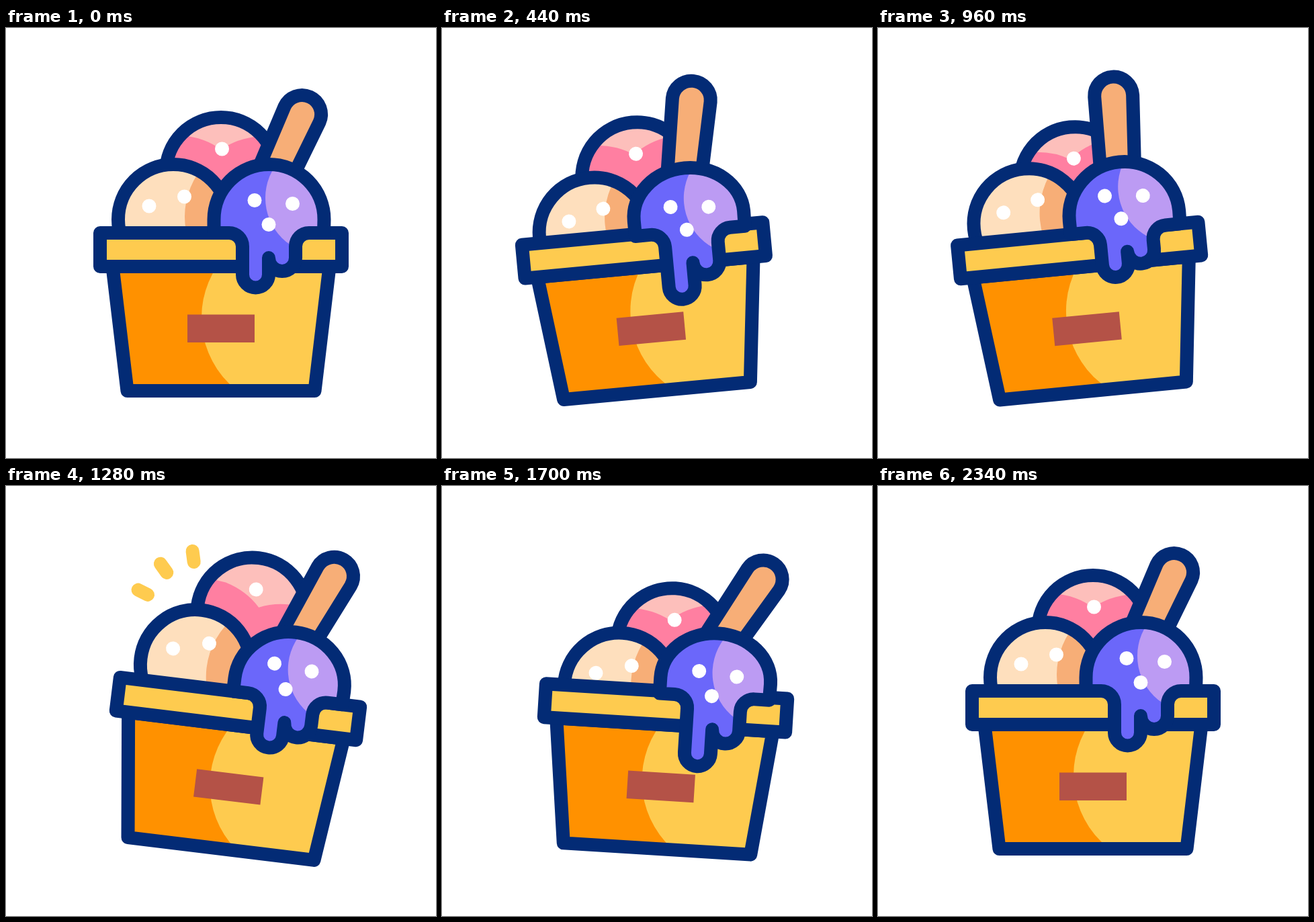
Write an HTML page with a canvas that moves like this. It is 640 px wide and 640 px high and loops after 2400 ms.

```html
<!DOCTYPE html>
<html lang="en">
<head>
<meta charset="utf-8">
<title>Ice cream tub</title>
<style>
  html, body { margin: 0; width: 100%; height: 100%; overflow: hidden; background: #fff; }
  canvas { display: block; width: 100vw; height: 100vh; }
</style>
</head>
<body>
<canvas id="stage" width="640" height="640"></canvas>
<script>
const ctx = document.getElementById('stage').getContext('2d');
const LOOP = 2400;
const TAU = Math.PI * 2;
const RAD = Math.PI / 180;
const NAVY = '#032b75', YELLOW = '#fecb4f', ORANGE = '#ff9100', CARAMEL = '#f7ae77';

// All scoops bounce to the same beats (ms), each with its own delay and heights.
const BEATS = [90, 650, 1070, 1640, 2000, 2150];

// Eased step from 0 to 1 between two times.
function ramp(t, from, to) {
  const u = Math.min(1, Math.max(0, (t - from) / (to - from)));
  return u * u * (3 - 2 * u);
}

function bounce(t, delay, ...peaks) {
  const stops = [0, ...peaks, 0];
  let y = 0;
  for (let i = 1; i < stops.length; i++) {
    y += (stops[i] - stops[i - 1]) * ramp(t - delay, BEATS[i - 1], BEATS[i]);
  }
  return y;
}

function disc(x, y, r, color) {
  ctx.fillStyle = color;
  ctx.beginPath();
  ctx.arc(x, y, r, 0, TAU);
  ctx.fill();
}

const dot = (x, y) => disc(x, y, 10.5, '#fff');

function polygon(...coords) {
  const path = new Path2D();
  for (let i = 0; i < coords.length; i += 2) path.lineTo(coords[i], coords[i + 1]);
  path.closePath();
  return path;
}

function circle(x, y, r) {
  const path = new Path2D();
  path.arc(x, y, r, 0, TAU);
  return path;
}

// Fill a shape, paint details clipped to it, then outline it.
function outlined(path, color, details) {
  ctx.fillStyle = color;
  ctx.fill(path);
  if (details) {
    ctx.save();
    ctx.clip(path);
    details();
    ctx.restore();
  }
  ctx.strokeStyle = NAVY;
  ctx.lineWidth = 20;
  ctx.stroke(path);
}

function drawRays(t) {
  const head = 62.5 + 50 * ramp(t, 1080, 1340);
  const tail = 62.5 + 50 * ramp(t, 1122, 1422);
  if (head <= tail) return;
  ctx.strokeStyle = YELLOW;
  ctx.lineWidth = 20;
  for (let i = 0; i < 3; i++) {
    const angle = (199.6 + 28 * i) * RAD;
    const c = Math.cos(angle), s = Math.sin(angle);
    ctx.beginPath();
    ctx.moveTo(250.5 + c * tail, 208 + s * tail);
    ctx.lineTo(250.5 + c * head, 208 + s * head);
    ctx.stroke();
  }
}

function drawPink(t) {
  const y = bounce(t, 180, 26, -30, 24.5, -11);
  ctx.save();
  ctx.translate(3.5 * (ramp(t, 400, 800) - ramp(t, 1700, 2250)), y);
  outlined(circle(320, 215, 82), '#ff7fa1', () => {
    // The shine lags behind and tips against the bounce.
    ctx.translate(320 - 0.3 * y, 180 - 0.85 * Math.min(y, 0));
    ctx.rotate(-0.35 * y * RAD);
    ctx.fillStyle = '#fdbfbb';
    ctx.beginPath();
    ctx.moveTo(-100, -17);
    ctx.lineTo(-58, -20);
    ctx.quadraticCurveTo(-24, -17, 0, 1);
    ctx.quadraticCurveTo(24, -16, 58, -19);
    ctx.lineTo(110, -17);
    ctx.lineTo(110, -120);
    ctx.lineTo(-100, -120);
    ctx.fill();
  });
  dot(321.5, 180);
  ctx.restore();
}

function drawStick(t) {
  const lift = 11 * (ramp(t, 0, 900) - ramp(t, 1150, 2200));
  const angle = 24.5 - 26.3 * ramp(t, 60, 800) + 34.3 * ramp(t, 800, 1530) - 8 * ramp(t, 1530, 2100);
  ctx.save();
  ctx.translate(387.5, 245 - lift);
  ctx.rotate(angle * RAD);
  const path = new Path2D();
  path.moveTo(-25, 0);
  path.lineTo(-28.5, -128);
  path.arc(0, -128, 28.5, Math.PI, TAU);
  path.lineTo(25, 0);
  outlined(path, CARAMEL);
  ctx.restore();
}

function drawTan(t) {
  const y = bounce(t, 70, 23.5, -18, 19.5, -8);
  ctx.save();
  ctx.translate(0, y);
  outlined(circle(249, 285, 82), '#fedfbd', () => disc(381, 281 - 0.5 * y, 115, CARAMEL));
  dot(213, 265);
  dot(265.5, 251);
  ctx.restore();
}

function drawTub() {
  outlined(polygon(158.5, 355, 180.5, 540, 459.5, 540, 481.5, 355), ORANGE,
    () => disc(429, 431, 138, YELLOW));
  ctx.fillStyle = '#b45247';
  ctx.fillRect(270, 426.5, 100, 41.5);
  outlined(polygon(140, 305, 500, 305, 500, 355, 140, 355), YELLOW);
}

function drawPurple(t) {
  const drip = bounce(t, 0, 31.2, -20, 30, -6);
  const sag = ramp(t, 0, 400) - ramp(t, 1550, 2150);
  const top = 4.8 * sag + 0.27 * drip;
  const base = 305 + 0.14 * Math.max(drip, 0);
  const shift = 2.3 * sag + 0.5 * drip;
  const long = 367 + drip, short = 342 + shift;
  const path = new Path2D();
  path.moveTo(309.5, base);
  path.lineTo(309.5, 285);
  path.ellipse(391.5, 285, 82, 82 - top, 0, Math.PI, TAU);
  path.lineTo(473, base);
  path.lineTo(451, base);
  path.arcTo(431, base, 431, base + 20, 20);
  path.lineTo(431, short);
  path.arc(411, short, 20, 0, Math.PI);
  path.lineTo(391, long);
  path.arc(371.5, long, 19.5, 0, Math.PI);
  path.lineTo(352, base + 20);
  path.arcTo(352, base, 332, base, 20);
  path.closePath();
  outlined(path, '#6b67fa', () => disc(470, 253 + shift, 84, '#bc9bf3'));
  const dx = -4.5 * sag;
  dot(370 + dx, 256.5 + shift);
  dot(426.5 + dx, 261.5 + shift);
  dot(391 + dx, 292.5 + shift);
}

function draw(t) {
  const tilt = -12 * ramp(t, 165, 760) + 21.2 * ramp(t, 690, 1430) - 9.2 * ramp(t, 1332, 1972);
  ctx.setTransform(1, 0, 0, 1, 0, 0);
  ctx.fillStyle = '#fff';
  ctx.fillRect(0, 0, 640, 640);
  ctx.lineCap = ctx.lineJoin = 'round';
  ctx.translate(320, 540);
  ctx.rotate(tilt * RAD);
  ctx.translate(-320, -540);
  drawRays(t);
  drawPink(t);
  drawStick(t);
  drawTan(t);
  drawTub();
  drawPurple(t);
}

const start = performance.now();
function tick() {
  draw((performance.now() - start) % LOOP);
  requestAnimationFrame(tick);
}
tick();
</script>
</body>
</html>
```
